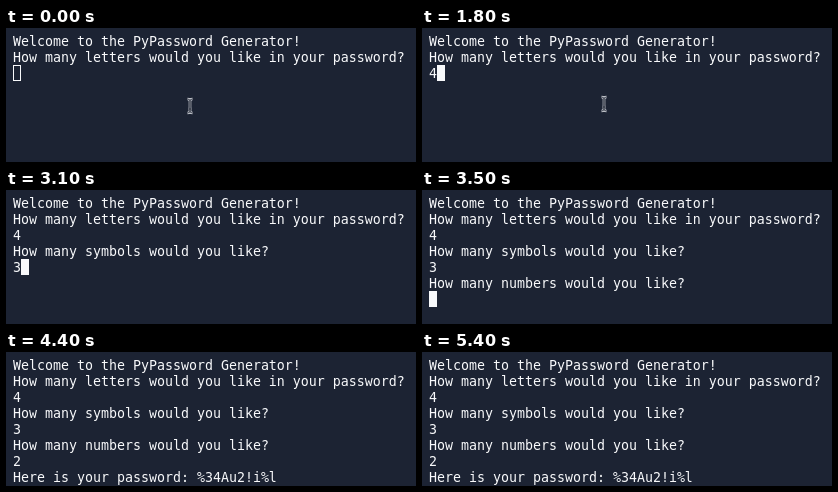
Recreate the animation shown at these times as an HTML page with a canvas. Size 410 by 134 pixels, loop 6.2 s.

```html
<!DOCTYPE html>
<html lang="en">
<head>
<meta charset="utf-8">
<title>Password generator in a terminal</title>
<style>
  html, body { margin: 0; height: 100%; overflow: hidden; background: #1c2333; }
  canvas { display: block; }
</style>
</head>
<body>
<canvas width="410" height="134"></canvas>
<script>
const ctx = document.querySelector('canvas').getContext('2d');
const LOOP = 6200, LEFT = 7, TOP = 5, CHAR = 8, LINE = 16;
const BACK = '#1c2333', INK = '#f8f9fb';

// [time the line appears, text]
const lines = [
  [0, 'Welcome to the PyPassword Generator!'],
  [0, 'How many letters would you like in your password?'],
  [1800, '4'],
  [2200, 'How many symbols would you like?'],
  [3100, '3'],
  [3500, 'How many numbers would you like?'],
  [4000, '2'],
  [4400, 'Here is your password: %34Au2!i%l']
];

// [from, column, row] of the block cursor; it is gone once column is -1
const blocks = [
  [0, 0, 2], [1800, 1, 2], [2200, 0, 4], [3100, 1, 4],
  [3500, 0, 6], [4000, 1, 6], [4400, -1, 0]
];

// [from, x, y] of the mouse pointer's centre; hidden without a position
const pointers = [[0, 184, 78], [100, 182, 76], [2400], [5300, 224, 110.5], [5400]];

const latest = (steps, t) => steps.filter(step => step[0] <= t).pop();

function drawBlock(t) {
  const [, column, row] = latest(blocks, t);
  if (column < 0) return;
  const x = LEFT + column * CHAR, y = TOP + row * LINE;
  ctx.fillStyle = ctx.strokeStyle = INK;
  ctx.lineWidth = 1;
  if (t < 400) ctx.strokeRect(x + 0.5, y + 0.5, CHAR - 1, LINE - 1);
  else ctx.fillRect(x, y, CHAR, LINE);
}

function drawPointer(t) {
  const [, x, y] = latest(pointers, t);
  if (x === undefined) return;
  const beam = new Path2D(`M${x - 2.5} ${y - 7}q2.5 0 2.5 2v10q0 2 -2.5 2
    M${x + 2.5} ${y - 7}q-2.5 0 -2.5 2v10q0 2 2.5 2M${x - 1.5} ${y + 3}h3`);
  for (const [color, width] of [['#d5d8de', 2.6], ['#252b39', 0.9]]) {
    ctx.strokeStyle = color;
    ctx.lineWidth = width;
    ctx.stroke(beam);
  }
}

function draw(now) {
  const t = now % LOOP;
  ctx.fillStyle = BACK;
  ctx.fillRect(0, 0, 410, 134);
  ctx.font = '13.29px "DejaVu Sans Mono", monospace';
  ctx.fillStyle = INK;
  lines.forEach(([start, text], row) => {
    if (t >= start) ctx.fillText(text, LEFT, TOP + 13 + row * LINE);
  });
  drawBlock(t);
  drawPointer(t);
  requestAnimationFrame(draw);
}
requestAnimationFrame(draw);
</script>
</body>
</html>
```
